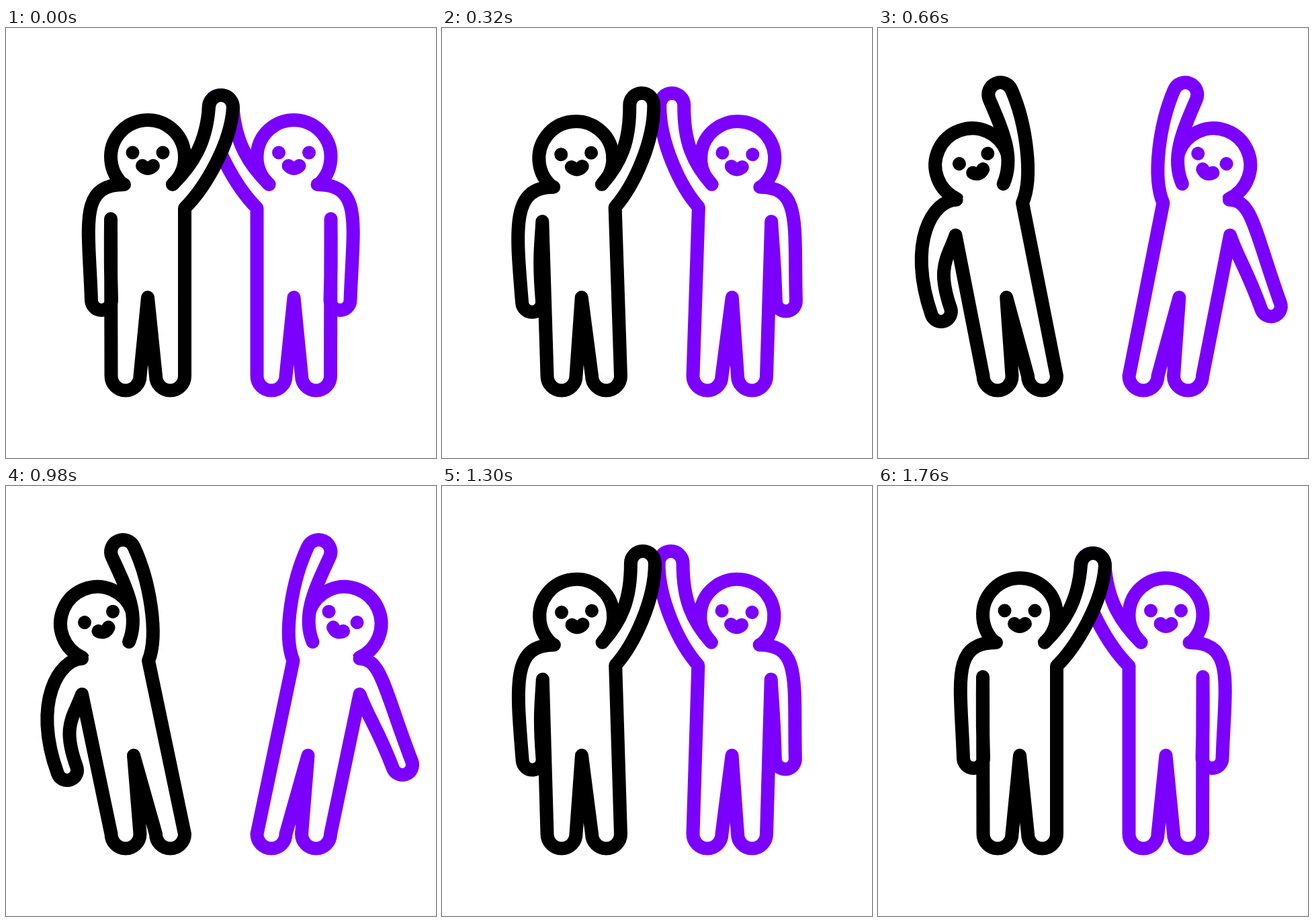
Write an HTML page with a canvas that moves like this. It is 640x640 px and loops after 2.4 s.

```html
<!DOCTYPE html>
<html>
<head>
<meta charset="utf-8">
<style>
html, body { margin: 0; height: 100%; overflow: hidden; background: #fff; }
canvas { display: block; }
</style>
</head>
<body>
<canvas id="stage" width="640" height="640"></canvas>
<script>
const ctx = document.getElementById('stage').getContext('2d');
const LOOP = 2400, OUT = 900, BACK = 615, RAD = Math.PI / 180;

// Key points of the body; aims, lift and tilt are angles in degrees.
const meet = {
  head: [211, 192], face: [211, 185.5], tilt: 0,
  neck: [176, 233], slope: 68, far: [142, 405], farAim: 88, pit: [156, 284], pitAim: 90,
  crotch: [211, 401],
  shoulder: [266, 268], lift: -45, near: [320, 118], nearAim: -86, collar: [248, 233]
};
const lean = {
  head: [136, 205], face: [138, 195], tilt: -21,
  neck: [113, 257], slope: 32, far: [91, 423], farAim: 70, pit: [113, 310], pitAim: 110,
  crotch: [190, 401],
  shoulder: [212, 260], lift: -68, near: [174, 98], nearAim: -115, collar: [183, 232]
};
const leanWide = { ...lean, far: [49.5, 415], farAim: 111 };

const lerp = (a, b, p) => Array.isArray(a) ? a.map((v, i) => lerp(v, b[i], p)) : a + (b - a) * p;

function blend(a, b, p) {
  const pose = {};
  for (const key in a) pose[key] = lerp(a[key], b[key], p);
  return pose;
}

// The point at a distance from another, in a direction given in degrees
const step = ([x, y], angle, dist) =>
  [x + dist * Math.cos(angle * RAD), y + dist * Math.sin(angle * RAD)];

const angleTo = ([x, y], [u, v]) => Math.atan2(v - y, u - x);

// An arm outline: out along one side, round the hand, back along the other.
// Each side is [root, root angle, root handle, hand handle].
function limb(out, hand, aim, r, back) {
  const a = step(hand, aim + 90, r), b = step(hand, aim - 90, r);
  const [root, angle, grip, reach] = out, [end, endAngle, endGrip, endReach] = back;
  ctx.lineTo(...root);
  ctx.bezierCurveTo(...step(root, angle, grip), ...step(a, aim, -reach), ...a);
  ctx.arc(...hand, r, (aim + 90) * RAD, (aim - 90) * RAD, true);
  ctx.bezierCurveTo(...step(b, aim, -endReach), ...step(end, endAngle, endGrip), ...end);
}

// Bezier easing (.72, 0, .28, 1)
function ease(x) {
  if (x <= 0) return 0;
  if (x >= 1) return 1;
  let lo = 0, hi = 1, t;
  for (let i = 0; i < 24; i++) {
    t = (lo + hi) / 2;
    const u = 1 - t;
    if (2.16 * u * u * t + 0.84 * u * t * t + t * t * t < x) lo = t; else hi = t;
  }
  return t * t * (3 - 2 * t);
}

function drawFace(color, face, tilt) {
  ctx.save();
  ctx.translate(...face);
  ctx.rotate(tilt * RAD);
  ctx.fillStyle = color;
  for (const x of [-22.5, 22.5]) {
    ctx.beginPath();
    ctx.arc(x, 0, 10, 0, 7);
    ctx.fill();
  }
  ctx.beginPath();
  ctx.moveTo(-8, 19.5);
  ctx.quadraticCurveTo(0, 27.5, 8, 19.5);
  ctx.stroke();
  ctx.restore();
}

function figure(color, away, p) {
  const b = blend(meet, away, p);
  ctx.strokeStyle = color;
  ctx.fillStyle = '#fff';

  ctx.beginPath();
  ctx.arc(...b.head, 55, angleTo(b.head, b.neck), angleTo(b.head, b.collar));
  ctx.fill();
  ctx.stroke();

  ctx.beginPath();
  limb([b.neck, 180, b.slope, 115], b.far, b.farAim, 15, [b.pit, b.pitAim, 37, 65]);
  ctx.arc(178, 518, 21.5, Math.PI, 0, true);
  ctx.lineTo(...b.crotch);
  ctx.arc(244.5, 518, 21.5, Math.PI, 0, true);
  limb([b.shoulder, b.lift, 42, 55], b.near, b.nearAim, 18, [b.collar, b.lift, 42, 55]);
  ctx.fill();
  ctx.stroke();

  drawFace(color, b.face, b.tilt);
}

// A short dash that shoots away from the clap
function spark(t) {
  if (t < 1500 || t >= 1760) return;
  const from = [347, 94], to = [389, 56];
  ctx.beginPath();
  ctx.moveTo(...lerp(from, to, ease((t - 1620) / 140)));
  ctx.lineTo(...lerp(from, to, ease((t - 1500) / 130) + 0.001));
  ctx.stroke();
}

function draw() {
  const t = performance.now() % LOOP;
  const p = 1.013 * (t < OUT ? ease(t / OUT) : 1 - ease((t - OUT) / BACK));
  ctx.fillStyle = '#fff';
  ctx.fillRect(0, 0, 640, 640);
  ctx.lineWidth = 20;
  ctx.lineCap = ctx.lineJoin = 'round';

  ctx.save();
  ctx.translate(639.5, 0);
  ctx.scale(-1, 1);
  figure('#7b00ff', leanWide, p);
  ctx.restore();
  figure('#000', lean, p);
  spark(t);
  requestAnimationFrame(draw);
}
draw();
</script>
</body>
</html>
```
